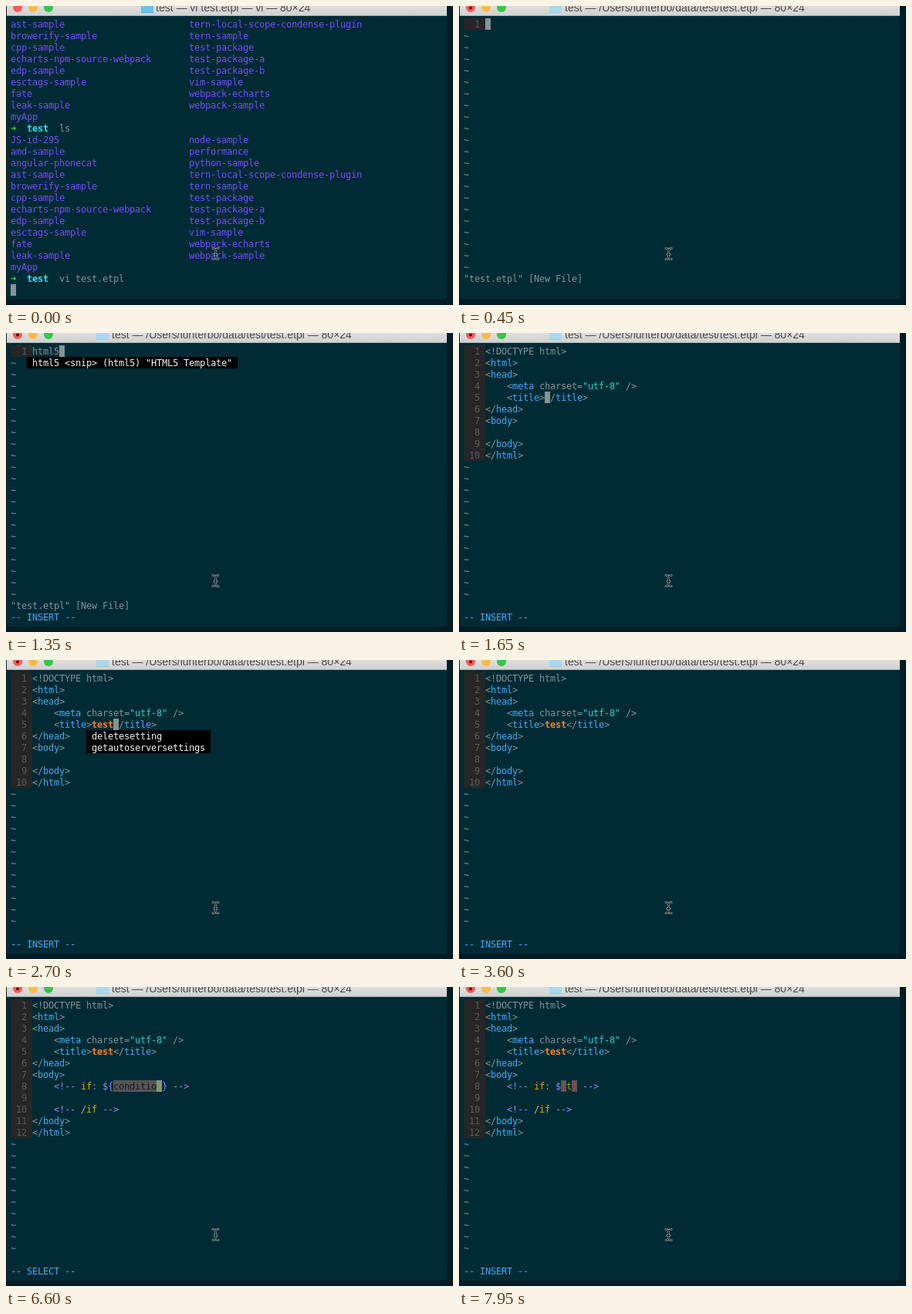
An HTML page with a canvas that plays this animation: 579x388 px, repeating every 8000 ms.

```html
<!DOCTYPE html>
<html lang="en">
<head>
<meta charset="utf-8">
<title>Terminal session</title>
<style>
html, body { margin: 0; width: 100%; height: 100%; overflow: hidden; background: #011c24; }
canvas { display: block; width: 579px; height: 388px; }
</style>
</head>
<body>
<canvas id="stage" width="579" height="388"></canvas>
<script>
const ctx = document.getElementById('stage').getContext('2d');
const LOOP = 8000, CELL_W = 7, CELL_H = 15, LEFT = 6, TOP = 16;
const MONO = '"DejaVu Sans Mono", monospace';
const C = {
  desk: '#011c24', bg: '#002b35', gray: '#839496', purple: '#7a4bff', green: '#2fee2f',
  cyan: '#2ee6ee', blue: '#4aa9f8', string: '#2fd0c8', orange: '#ff7d2a', gutter: '#262626',
  number: '#5a5a5a', violet: '#8c88ff', yellow: '#d3a810', lime: '#8aa010',
  select: '#545454', selectText: '#1c1c1c', red: '#d23a36'
};

const cellX = col => LEFT + col * CELL_W;
const rowY = row => TOP + row * CELL_H;

function box(row, col, cols, color, rows = 1) {
  ctx.fillStyle = color;
  ctx.fillRect(cellX(col), rowY(row), cols * CELL_W, rows * CELL_H);
}

function put(row, col, text, color = C.gray, bold = false) {
  ctx.font = (bold ? 'bold ' : '') + '12px ' + MONO;
  ctx.fillStyle = color;
  [...text].forEach((ch, i) => {
    if (ch !== ' ') ctx.fillText(ch, cellX(col + i), rowY(row) + 12);
  });
}

// Writes [text, color] pairs one after another
function runs(row, col, parts) {
  for (const [text, color] of parts) {
    put(row, col, text, color);
    col += text.length;
  }
}

const cursor = (row, col) => box(row, col, 1, C.gray);

function popup(row, col, lines) {
  const width = Math.max(...lines.map(l => l.length)) + 2;
  box(row, col, width, '#000', lines.length);
  lines.forEach((line, i) => put(row + i, col + 1, line, '#f4f4f4'));
}

function disc(x, y, r, color) {
  ctx.fillStyle = color;
  ctx.beginPath();
  ctx.arc(x, y, r, 0, Math.PI * 2);
  ctx.fill();
}

function folder(x, color, edge) {
  ctx.fillStyle = color;
  ctx.beginPath();
  ctx.roundRect(x, -4, 16, 13, 1);
  ctx.fill();
  ctx.fillStyle = edge;
  ctx.fillRect(x, 8, 16, 1);
}

function frameWindow(editing) {
  ctx.fillStyle = C.desk;
  ctx.fillRect(0, 0, 579, 388);
  ctx.fillStyle = C.bg;
  ctx.beginPath();
  ctx.roundRect(1, -10, 570, 391, 4);
  ctx.fill();

  const bar = ctx.createLinearGradient(0, 0, 0, 13);
  bar.addColorStop(0, '#dedede');
  bar.addColorStop(1, '#d0d0d0');
  ctx.fillStyle = bar;
  ctx.fillRect(1, 0, 570, 13);
  ctx.fillStyle = '#a9aeb0';
  ctx.fillRect(1, 12, 570, 1);

  ['#fc5b57', '#fdbc40', '#34c749'].forEach((color, i) => disc(15 + i * 20, 2, 6, color));
  if (editing) {
    disc(15, 2.5, 2, '#5f0c0a');
    folder(117, '#a8d9ec', '#9accdf');
  } else {
    folder(175, '#6cc2ec', '#57aedb');
  }
  ctx.font = '14px "Liberation Sans", Arial, sans-serif';
  ctx.fillStyle = '#484848';
  if (editing) ctx.fillText('test — /Users/lunterbo/data/test/test.etpl — 80×24', 137, 7);
  else ctx.fillText('test — vi test.etpl — vi — 80×24', 194, 7);
}

function pointer() {
  const path = new Path2D('M268 314.5 Q271.5 314.5 271.5 317.5 V325.5 Q271.5 328.5 268 328.5 ' +
    'M275 314.5 Q271.5 314.5 271.5 317.5 M271.5 325.5 Q271.5 328.5 275 328.5 M270 322.5 H273');
  ctx.lineCap = 'square';
  for (const [width, color] of [[2.6, '#8b979a'], [1, '#06151a']]) {
    ctx.lineWidth = width;
    ctx.strokeStyle = color;
    ctx.stroke(path);
  }
}

const LS_LEFT = ['JS-id-295', 'amd-sample', 'angular-phonecat', 'ast-sample', 'browerify-sample',
  'cpp-sample', 'echarts-npm-source-webpack', 'edp-sample', 'esctags-sample', 'fate',
  'leak-sample', 'myApp'];
const LS_RIGHT = ['node-sample', 'performance', 'python-sample', 'tern-local-scope-condense-plugin',
  'tern-sample', 'test-package', 'test-package-a', 'test-package-b', 'vim-sample',
  'webpack-echarts', 'webpack-sample'];

function listing(row, skip) {
  LS_LEFT.slice(skip).forEach((name, i) => put(row + i, 0, name, C.purple));
  LS_RIGHT.slice(skip).forEach((name, i) => put(row + i, 33, name, C.purple));
}

function prompt(row, command) {
  put(row, 0, '➜', C.green, true);
  put(row, 3, 'test', C.cyan, true);
  put(row, 9, command);
}

function shell() {
  listing(0, 3);
  prompt(9, 'ls');
  listing(10, 0);
  prompt(22, 'vi test.etpl');
  cursor(23, 0);
}

function gutter(count) {
  box(0, 0, 4, C.gutter, count);
  for (let i = 0; i < count; i++) put(i, 0, String(i + 1).padStart(3), C.number);
  for (let i = count; i < 22; i++) put(i, 0, '~');
}

function markup(row, line) {
  for (const m of line.matchAll(/"[^"]*"|[a-z]+|./g)) {
    const word = m[0], before = line.slice(0, m.index);
    let color = C.gray;
    if (word[0] === '"') color = C.string;
    else if (/[a-z]/.test(word)) {
      if (/<\/?$/.test(before)) color = C.blue;
      else if (before.endsWith('>')) color = C.orange;
    }
    put(row, 4 + m.index, word, color, color === C.orange);
  }
}

function page(title, body) {
  ['<!DOCTYPE html>', '<html>', '<head>', '    <meta charset="utf-8" />',
    `    <title>${title}</title>`, '</head>', '<body>'].forEach((line, i) => markup(i, line));
  markup(7 + body, '</body>');
  markup(8 + body, '</html>');
}

function startVim(t) {
  if (t < 450) cursor(22, 0);
  put(22, 0, '"test.etpl" [New File]');
  if (t < 450) return;
  gutter(1);
  const typed = t < 900 ? '' : t < 1050 ? 'h' : t < 1200 ? 'htm' : t < 1350 ? 'html' : 'html5';
  if (typed !== 'h' && typed !== 'html') cursor(0, 4 + typed.length);
  put(0, 4, typed);
  if (typed === 'htm') {
    popup(1, 3, ['html', 'html5      <snip> (html5) "HTML5 Template"',
      'html:qunit <snip> (html:qunit) "qunit setup"']);
  } else if (typed === 'html5') {
    popup(1, 3, ['html5 <snip> (html5) "HTML5 Template"']);
  }
}

function editPage(t) {
  gutter(10);
  const title = t < 2400 ? '' : t < 2550 ? 't' : 'test';
  if (t < 2400) cursor(4, 15);
  else if (t >= 2700 && t < 2850) cursor(4, 19);
  else if (t >= 2850 && t < 6300) {
    const flips = [3600, 4050, 4500, 5100, 5550, 6000].filter(at => t >= at).length;
    if (flips % 2 === 0) cursor(7, 8);
  } else if (t >= 6450) cursor(7, 10);
  page(title, 1);
  if (t >= 6300) put(7, 8, t < 6450 ? 'i' : 'if');
  if (t >= 2700 && t < 2850) popup(5, 14, ['deletesetting', 'getautoserversettings']);
}

function editCondition(t) {
  gutter(12);
  page('test', 3);
  const open = [['<!-- ', C.violet], ['if', C.yellow], [': ', C.gray], ['$', C.violet]];
  if (t < 7950) {
    box(7, 19, 8, C.select);
    if (t < 7500) cursor(7, 27);
    runs(7, 8, [...open, ['{', C.violet], ['conditio', C.selectText], ['n', C.lime],
      ['} -->', C.violet]]);
  } else {
    box(7, 18, 1, C.select);
    box(7, 20, 1, C.select);
    runs(7, 8, [...open, ['{', C.red], ['t', C.lime], ['}', C.red], [' -->', C.violet]]);
  }
  runs(9, 8, [['<!-- ', C.violet], ['/', '#b9b49a'], ['if', C.yellow], [' -->', C.violet]]);
}

function draw(t) {
  frameWindow(t >= 150);
  if (t < 150) shell();
  else if (t < 1650) startVim(t);
  else if (t < 6600) editPage(t);
  else editCondition(t);
  if (t >= 750) {
    const mode = t >= 6600 && t < 7950 ? 'SELECT' : 'INSERT';
    put(23, 0, `-- ${mode} --`, C.blue);
  }
  pointer();
}

const start = performance.now();
function tick() {
  draw((performance.now() - start) % LOOP);
  requestAnimationFrame(tick);
}
tick();
</script>
</body>
</html>
```
